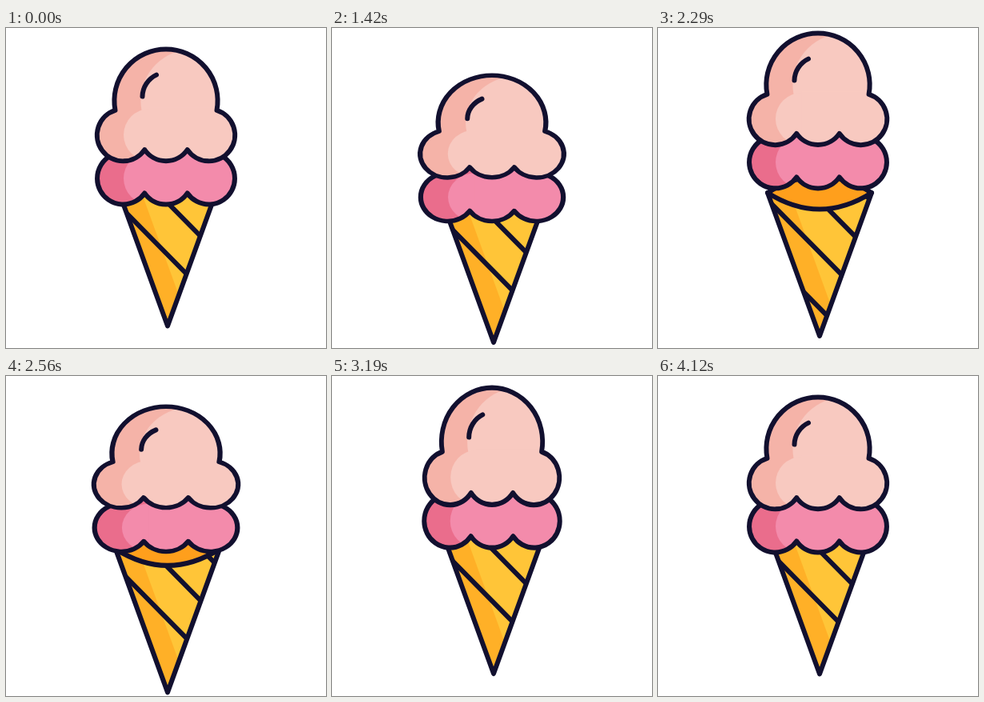
Write an HTML page that moves like this. It is 400x400 px and loops after 4.15 s.

```html
<!DOCTYPE html>
<html lang="en">
<head>
<meta charset="utf-8">
<title>Ice cream</title>
<style>
  html, body { margin: 0; width: 100%; height: 100%; overflow: hidden; background: #fff; }
  svg { display: block; width: 100%; height: 100%; }
  .line { fill: none; stroke: #12102f; stroke-width: 6; stroke-linecap: round; stroke-linejoin: round; vector-effect: non-scaling-stroke; }
</style>
</head>
<body>
<svg viewBox="0 0 400 400">
  <defs>
    <path id="coneShape" d="M-65 -179L0 0L65 -179Z"/>
    <path id="pinkShape" d="M-53.5 -32.5A32.5 32.5 0 1 0 -26.75 18.5A32.5 32.5 0 0 0 26.75 18.5A32.5 32.5 0 1 0 53.5 -32.5L30 -46H-30Z"/>
    <path id="peachShape" d="M-63.5 -30.7A32.5 32.5 0 1 0 -26.75 18.5A32.5 32.5 0 0 0 26.75 18.5A32.5 32.5 0 1 0 63.5 -30.7A64.6 64.6 0 1 0 -63.5 -30.7Z"/>
    <clipPath id="coneClip"><use href="#coneShape"/></clipPath>
    <clipPath id="pinkClip"><use href="#pinkShape"/></clipPath>
    <clipPath id="peachClip"><use href="#peachShape"/></clipPath>
  </defs>

  <g id="rays"></g>

  <g id="cone">
    <g clip-path="url(#coneClip)">
      <use href="#coneShape" fill="#ffb027"/>
      <use href="#coneShape" x="28" fill="#ffc538"/>
      <g id="stripes"></g>
    </g>
    <use href="#coneShape" class="line"/>
    <path id="rim" class="line" style="fill:#ff9f1c"/>
  </g>

  <g id="pink">
    <g clip-path="url(#pinkClip)">
      <use href="#pinkShape" fill="#ea6d8c"/>
      <g fill="#f38bab">
        <circle cx="-20.5" r="32.5"/>
        <rect x="-20.5" y="-50" width="120" height="90"/>
      </g>
    </g>
    <use href="#pinkShape" class="line"/>
  </g>

  <g id="peach">
    <g clip-path="url(#peachClip)">
      <use href="#peachShape" fill="#f5b3a8"/>
      <g fill="#f8c9c0">
        <circle cx="33" cy="-42.5" r="64.6"/>
        <circle cx="-20.5" r="32.5"/>
        <rect x="-20.5" y="-34" width="120" height="75"/>
      </g>
    </g>
    <use href="#peachShape" class="line"/>
    <path class="line" d="M-29.5 -48A30.5 30.5 0 0 1 -12 -75"/>
  </g>
</svg>
<script>
const LOOP = 4150, START = 1030, STEP = 30;
const $ = id => document.getElementById(id);
const clamp = v => Math.max(0, Math.min(1, v));

const smooth = p => (1 - Math.cos(Math.PI * p)) / 2;
const rise = p => 1 - (1 - p) ** 2;
const fall = p => p * p;

// Starts from rest, then eases to each [time, value, ease] in turn
function path(...poses) {
  return t => {
    let from = START, value = 0;
    for (const [time, goal, ease = smooth] of poses) {
      value += (goal - value) * ease(clamp((t - from) / (time - from)));
      from = time;
    }
    return value;
  };
}

// Crouch, leap, land, spring up, settle
const coneShift = path([1560, 24.5], [2010, 3], [2590, 23], [3420, -5.5], [4110, 0]);
const scoopShift = path([1560, 28], [2185, -22, rise], [2720, 26, fall], [3280, -9], [4110, 0]);
const squash = path([1640, .06], [2250, 0], [2700, .06], [3420, -.047], [4110, 0]);

function addLine(parent) {
  const el = document.createElementNS("http://www.w3.org/2000/svg", "path");
  el.setAttribute("class", "line");
  return parent.appendChild(el);
}

const GAP = 47.5;
const stripes = [0, 1, 2, 3].map(() => addLine($("stripes")));

// Left rays as inner x, y and outer x, y; the right side mirrors them
const rays = [];
for (const [x0, y0, x1, y1] of [[117, 173, 60, 122], [104, 199, 12, 164], [110, 227.5, 24, 230.7]]) {
  rays.push({ x0, y0, x1, y1, el: addLine($("rays")) });
  rays.push({ x0: 407 - x0, y0, x1: 407 - x1, y1, el: addLine($("rays")) });
}

function placeScoop(el, y, q) {
  el.setAttribute("transform", `translate(200 ${y}) scale(${1 + q} ${1 - 2.05 * q})`);
}

function drawCone(t) {
  const shift = coneShift(t);
  $("cone").setAttribute("transform", `translate(202 ${372.5 + shift})`);

  // The mouth opens as the scoops lift off
  const depth = 41 * clamp((shift - scoopShift(t)) / 14);
  $("rim").setAttribute("d", `M-65 -179Q0 ${-179 + depth} 65 -179Q0 ${-179 - depth} -65 -179Z`);

  const turn = smooth(clamp((t - 1370) / 1360));
  stripes.forEach((el, i) => {
    let y = -65 - GAP * i + GAP * turn;
    if (i === 0) y += 22 * turn ** 7; // the lowest one slips off the tip
    el.setAttribute("d", `M${10 - .363 * y} ${y + 10}l-150 -152`);
  });
}

function drawRays(t) {
  const ease = (from, span) => 1 - (1 - clamp((t - from) / span)) ** 1.5;
  const head = ease(2670, 320), tail = ease(2745, 385);
  for (const { x0, y0, x1, y1, el } of rays) {
    const at = p => `${x0 + (x1 - x0) * p} ${y0 + (y1 - y0) * p}`;
    el.setAttribute("d", head > tail ? `M${at(tail)}L${at(head)}` : "");
  }
}

function draw(t) {
  const shift = scoopShift(t);
  drawCone(t);
  placeScoop($("pink"), 188 + shift, squash(t - 40));
  placeScoop($("peach"), 133.6 + shift, squash(t));
  drawRays(t);
}

function tick() {
  const t = performance.now() % LOOP;
  draw(t < START ? 0 : START + Math.floor((t - START) / STEP) * STEP);
  requestAnimationFrame(tick);
}
tick();
</script>
</body>
</html>
```
